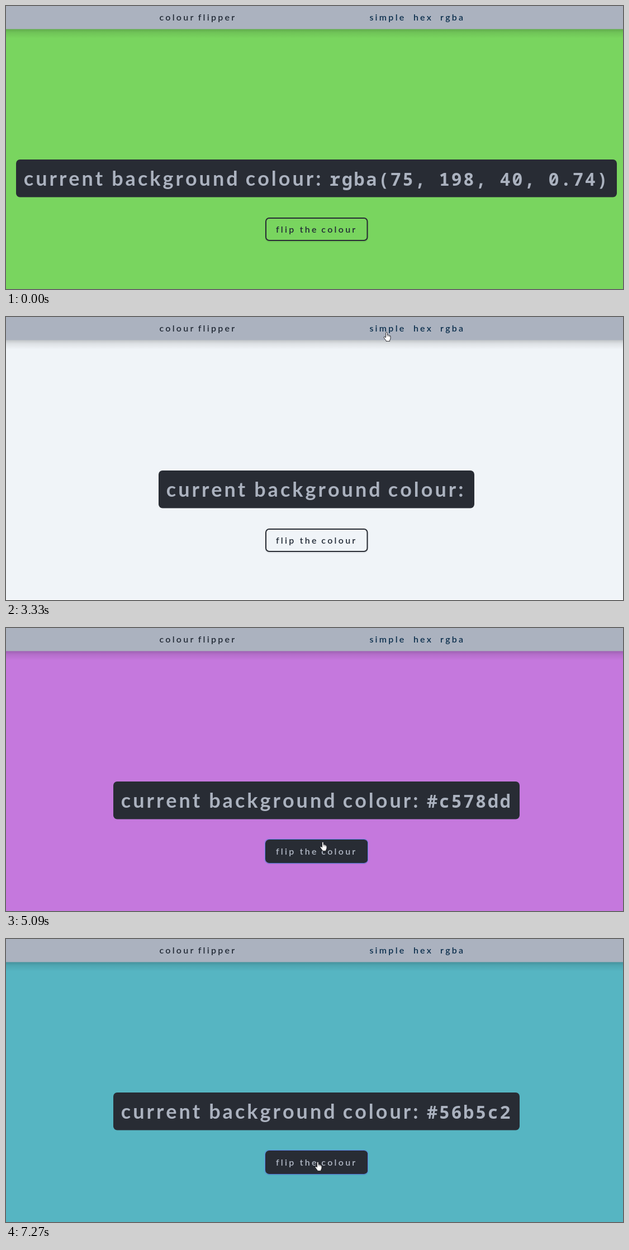
An HTML page for the animation above (8000 ms loop, 1104 by 507 pixels).

```html
<!DOCTYPE html>
<html lang="en">
<head>
<meta charset="utf-8">
<title>colour flipper</title>
<style>
  html, body { margin: 0; width: 100%; height: 100%; overflow: hidden; }
  svg { display: block; width: 1104px; height: 507px; }
  text { font-family: Lato, sans-serif; font-kerning: none; }
  .small { font-size: 16px; font-weight: 600; letter-spacing: 3.25px; }
  .title { font-size: 36px; font-weight: 700; letter-spacing: 4px; fill: #abb2bf; }
  #value { font: 600 32px "Noto Sans Mono", monospace; letter-spacing: 2.55px; fill: #abb2bf; white-space: pre; }
</style>
</head>
<body>
<svg viewBox="0 0 1104 507">
  <defs>
    <linearGradient id="shade" x1="0" y1="0" x2="0" y2="1">
      <stop offset="0" stop-opacity=".2"/>
      <stop offset=".4" stop-opacity=".08"/>
      <stop offset="1" stop-opacity="0"/>
    </linearGradient>
  </defs>
  <rect width="1104" height="507" fill="#fff"/>
  <rect id="page" width="1104" height="507"/>
  <rect y="41" width="1104" height="17" fill="url(#shade)"/>
  <rect width="1104" height="41.4" fill="#abb2bf"/>

  <g class="small" fill="#222a36">
    <text x="274.4" y="26">colour</text>
    <text x="343.7" y="26">flipper</text>
  </g>
  <g class="small" fill="#0c2f4d">
    <text id="link" x="650.4" y="26">simple</text>
    <text x="728.9" y="26">hex</text>
    <text x="777" y="26">rgba</text>
  </g>

  <rect id="panel" y="275" height="67.5" rx="7" fill="#282c34"/>
  <g id="heading" class="title">
    <text y="322">current</text>
    <text x="157.4" y="322">background</text>
    <text x="397" y="322">colour:</text>
  </g>
  <text id="value" y="322"></text>

  <rect x="464" y="379.5" width="183.5" height="43" rx="7" fill="none" stroke="#000" stroke-opacity=".1"/>
  <rect id="button" x="465" y="380" width="181.5" height="40" rx="6" fill="#282c34" stroke="#282c34" stroke-width="2"/>
  <rect id="focus" x="463.5" y="378.5" width="184" height="43" rx="6" fill="none" stroke="#5a80e4"/>
  <g id="label" class="small">
    <text x="482.9" y="406">flip</text>
    <text x="525.7" y="406">the</text>
    <text x="564.3" y="406">colour</text>
  </g>

  <g id="cursor" fill="#fff" stroke="#1c1c22" stroke-width=".9" stroke-linejoin="round">
    <path id="arrow" d="M0 0V11.6L2.7 9.1L4.5 13.4L6.5 12.5L4.7 8.4H8.5Z"/>
    <g id="hand">
      <path d="M-1.5 1.6Q-1.4 .3 -.2 .3Q1.1 .3 1.1 1.6V5Q2.9 4.4 3.4 5.7Q5 5.2 5.4 6.4Q7 6.2 7 8V11Q7 13.2 5.6 14.6V16.4H-.9V15.2Q-2.6 13.4 -4.6 10.2Q-5.2 8.8 -4.2 8.3Q-3.1 8 -1.5 10Z"/>
      <path d="M1.1 5V8M3.4 5.7V8.3M5.4 6.4V8.6" fill="none" stroke-width=".6"/>
    </g>
  </g>
</svg>
<script>
const LOOP = 8000, CENTER = 555.5, PADDING = 13.8, PITCH = 21.75;
const $ = id => document.getElementById(id);
const set = (id, attrs) => {
  for (const name in attrs) $(id).setAttribute(name, attrs[name]);
};

const screens = [
  { at: 0, page: '#79d55f', width: 1075, value: 'rgba(75, 198, 40, 0.74)' },
  { at: 3330, page: '#f0f4f8', width: 565, value: '' },
  { at: 3720, page: '#c578dd', width: 727, value: '#c578dd' },
  { at: 7200, page: '#56b5c2', width: 727, value: '#56b5c2' }
];

// Pointer moves: start, end, steps, then a quadratic curve
const moves = [
  [910, 1460, 8, [637, 545], [645, 300], [678, 69]],
  [1690, 2010, 5, [678, 69], [682, 27], [679, 25]],
  [2240, 2310, 2, [679, 25], [680, 26], [681, 27]],
  [3790, 4490, 10, [681, 27], [640, 215], [571, 372]],
  [4860, 5090, 4, [571, 372], [569, 378], [567, 383]],
  [6890, 6950, 2, [567, 383], [562, 391], [558, 399]]
];

// The first step lands at the start time, the last at the end time
function stepped(t, start, end, count) {
  if (t < start) return 0;
  const done = Math.floor((t - start) / (end - start) * (count - 1) + 1e-6) + 1;
  return Math.min(done, count) / count;
}

function pointerAt(t) {
  const [start, end, count, a, b, c] = moves.findLast(m => t >= m[0]) || moves[0];
  const u = stepped(t, start, end, count), v = 1 - u;
  return a.map((p, i) => v * v * p + 2 * u * v * b[i] + u * u * c[i]);
}

function mix(from, to, u) {
  return `rgb(${from.map((p, i) => Math.round(p + (to[i] - p) * u))})`;
}

function draw(t) {
  const screen = screens.findLast(s => t >= s.at);
  const left = CENTER - screen.width / 2;
  const right = left + screen.width;
  const blank = !screen.value;
  set('page', { fill: screen.page, height: blank ? 506 : 507 });
  set('panel', { x: left, width: screen.width });
  set('heading', { transform: `translate(${left + PADDING} 0)` });
  set('value', { x: right - PADDING - screen.value.length * PITCH });
  if ($('value').textContent !== screen.value) $('value').textContent = screen.value;

  const linkHover = t < 3330 ? stepped(t, 1770, 2010, 4) : 0;
  set('link', { fill: mix([12, 47, 77], [255, 255, 255], linkHover) });

  const hover = stepped(t, 4550, 4710, 3);
  set('button', { 'fill-opacity': hover });
  set('label', { fill: mix([34, 42, 54], [178, 185, 198], hover) });
  set('focus', { opacity: stepped(t, 4860, 5090, 4) });

  const [x, y] = pointerAt(t);
  const overTarget = y < 42 || (t >= 4490 && y > 370);
  set('cursor', { transform: `translate(${x} ${y})`, visibility: t < 910 ? 'hidden' : 'visible' });
  set('arrow', { display: overTarget ? 'none' : 'inline' });
  set('hand', { display: overTarget ? 'inline' : 'none' });
}

const begin = performance.now();
function tick() {
  draw((performance.now() - begin) % LOOP);
  requestAnimationFrame(tick);
}
tick();
</script>
</body>
</html>
```
